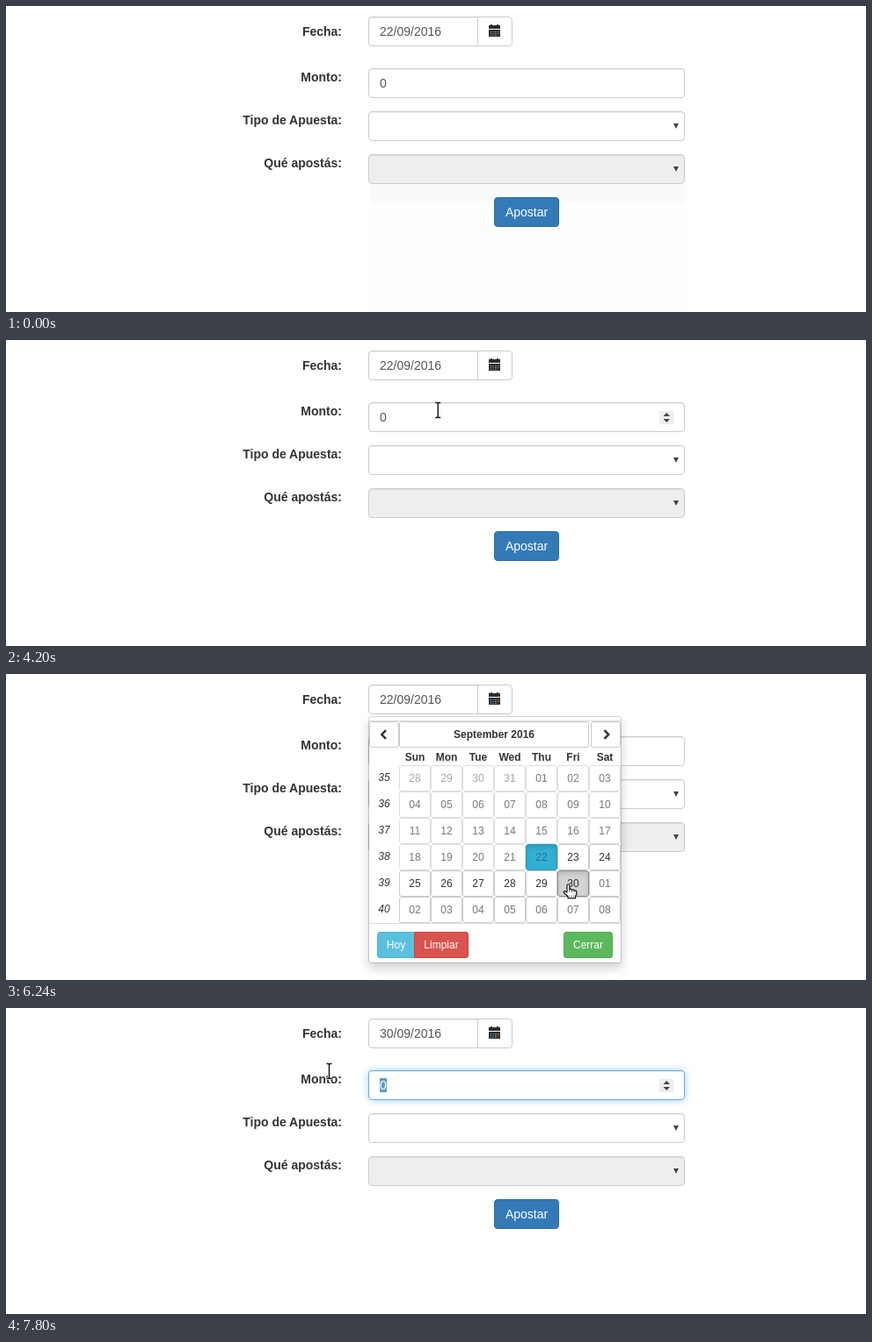
An HTML page that plays this animation: 978 px wide and 349 px high, repeating every 8 s.

```html
<!DOCTYPE html>
<html lang="es">
<head>
<meta charset="utf-8">
<title>Apuesta</title>
<style>
* { box-sizing: border-box; }
html, body { margin: 0; width: 100%; height: 100%; overflow: hidden; background: #fff; }
body { font: 14px/20px "Liberation Sans", Arial, sans-serif; color: #333; }
#stage { position: relative; width: 978px; height: 349px; overflow: hidden; }
#stage div { position: absolute; white-space: nowrap; }
svg { position: absolute; left: 0; top: 0; overflow: visible; }
.label { left: 182px; width: 200px; text-align: right; font-weight: bold; }
.field {
  left: 412px; width: 360px; height: 34px; padding: 6px 12px; color: #555; background: #fff;
  border: 1px solid #ccc; border-radius: 4px; box-shadow: inset 0 1px 1px rgba(0,0,0,.075);
}
.field.focus {
  border-color: #66afe9; z-index: 2;
  box-shadow: inset 0 1px 1px rgba(0,0,0,.075), 0 0 8px rgba(102,175,233,.6);
}
.btn { border: 1px solid #ccc; border-radius: 4px; background: #fff; text-align: center; }
.btn.hover { background: #e6e6e6; border-color: #adadad; }
.btn.down { background: #d4d4d4; border-color: #8c8c8c; box-shadow: inset 0 3px 5px rgba(0,0,0,.125); }
#pick { left: 536px; top: 12px; width: 40px; height: 34px; border-radius: 0 4px 4px 0; }
#send { left: 555px; top: 218px; width: 74px; height: 34px; padding: 6px 0; color: #fff; background: #337ab7; border-color: #2e6da4; }
#fade { left: 414px; top: 203px; width: 358px; height: 146px; background: #fdfefe; border-top: 22px solid #f9fafb; }
#spin { left: 743px; top: 81px; width: 16px; height: 15px; background: #eee; z-index: 3; }
#amount.sel span { background: #5a9dc0; color: #fff; }
#popup {
  left: 412px; top: 48px; width: 288px; height: 282px; z-index: 4; background: #fff; background-clip: padding-box;
  border: 1px solid rgba(0,0,0,.15); border-radius: 4px; box-shadow: 0 6px 12px rgba(0,0,0,.175);
  font-size: 12px; line-height: 18px;
}
#popup .btn { height: 30px; padding: 5px 0; border-radius: 3px; }
#popup .rule { left: 0; width: 286px; height: 1px; background: #ddd; }
#popup .head { width: 36px; text-align: center; font-weight: bold; }
#popup .week { left: 0; width: 34px; text-align: center; font-style: italic; }
#popup .muted { color: #777; }
#popup .off { opacity: .65; }
#popup .today {
  color: #31708f; background: #31b0d5; border-color: #269abc;
  box-shadow: inset 0 3px 5px rgba(0,0,0,.125);
}
#popup .today.hover { background: #269abc; border-color: #1b6d85; }
#popup .solid { color: #fff; }
#cursor { z-index: 9; }
</style>
</head>
<body>
<div id="stage">
  <div id="fade"></div>
  <div class="label" style="top:19px">Fecha:</div>
  <div class="label" style="top:71px">Monto:</div>
  <div class="label" style="top:120px">Tipo de Apuesta:</div>
  <div class="label" style="top:169px">Qué apostás:</div>

  <div class="field" id="date" style="top:12px;width:125px;border-radius:4px 0 0 4px"></div>
  <div class="btn" id="pick"></div>
  <div class="field" id="amount" style="top:71px"><span>0</span></div>
  <div class="field" style="top:120px"></div>
  <div class="field" style="top:169px;background:#eee"></div>
  <div class="btn" id="send">Apostar</div>

  <svg width="978" height="349">
    <path d="M759 134h6l-3 6zM759 183h6l-3 6z" fill="#444"/>
    <path d="M549 22h2v-1h2v1h5v-1h2v1h2v4h-13zM549 27h13v8h-13z" fill="#2d2d2d"/>
    <g stroke-width="1" fill="none" stroke-dasharray="1 1.5">
      <path d="M551 29.5h6M551 31.5h6M551 33.5h6" stroke="#7fa6c8"/>
      <path d="M557.5 29.5h4M557.5 31.5h4M557.5 33.5h2" stroke="#c98d5e"/>
    </g>
  </svg>

  <div id="spin"><svg width="16" height="15"><path d="M4.5 6h7.5l-3.75-4zM4.5 9h7.5l-3.75 4z" fill="#444"/></svg></div>

  <div id="popup">
    <div class="rule" style="top:4px"></div>
    <div class="rule" style="top:235px"></div>
    <svg width="286" height="280" style="z-index:1">
      <path d="M19 15.2l-4.7 4.8l4.7 4.8M267.500 15.2l4.700 4.800l-4.700 4.800" fill="none" stroke="#333" stroke-width="2.500"/>
    </svg>
  </div>

  <svg id="cursor" width="978" height="349">
    <g id="arrow">
      <path d="M.5.8V17l3.700-3.400 2.700 6 2.700-1.200-2.700-5.700h5z" fill="#fff" stroke="#111" stroke-width="1.200"/>
    </g>
    <g id="hand" transform="translate(-5 -1)">
      <path d="M4.500 10V2.200a1.400 1.400 0 0 1 2.900 0V6.500l1.800-.2 1 .8 1.800-.1 1 .9 1.800.3.6 1.200V12l-1.300 2.500v2.200H5.500v-2L1 10.500q-.6-2.200 1.300-1.700z"
        fill="#fff" stroke="#111" stroke-width="1.200" stroke-linejoin="round"/>
      <path d="M7.400 6.500v3M10 7.500v2.300M12.600 8.200v2" stroke="#111" stroke-width=".8"/>
      <path d="M7 14.300h6" stroke="#111" stroke-width="1" stroke-dasharray="1 1.300"/>
    </g>
    <g id="beam" fill="none">
      <path d="M-3-8.500h2l1 1 1-1h2M0-7.500v15M-3 8.500h2l1-1 1 1h2" stroke="#fff" stroke-width="3"/>
      <path d="M-3-8.500h2l1 1 1-1h2M0-7.500v15M-3 8.500h2l1-1 1 1h2" stroke="#111" stroke-width="1.400"/>
    </g>
  </svg>
</div>

<script>
const LOOP = 8000, STEP = 120;
const OPEN = 5040, CHOSEN = 6360, DRAG = 7560;
const $ = id => document.getElementById(id);
const popup = $("popup");

function add(cls, text, x, y, w) {
  const el = document.createElement("div");
  el.className = cls;
  el.textContent = text;
  el.style.left = x + "px";
  el.style.top = y + "px";
  if (w) el.style.width = w + "px";
  popup.append(el);
  return el;
}

function solid(text, x, w, fill, edge, radius) {
  const el = add("btn solid", text, x, 245, w);
  el.style.background = fill;
  el.style.borderColor = edge;
  el.style.borderRadius = radius;
}

add("btn", "", 0, 5, 34);
add("btn", "September 2016", 34, 5, 216).style.fontWeight = "bold";
add("btn", "", 252, 5, 34);
["Sun", "Mon", "Tue", "Wed", "Thu", "Fri", "Sat"].forEach((d, i) => add("head", d, 34 + 36 * i, 37));

const cells = {};
for (let row = 0; row < 6; row++) {
  add("week", 35 + row, 0, 60 + 30 * row);
  for (let col = 0; col < 7; col++) {
    const n = row * 7 + col - 3;
    const day = n < 1 ? n + 31 : n > 30 ? n - 30 : n;
    let cls = "btn";
    if (n < 1 || n > 30) cls += " muted";
    if (n < 22) cls += " off";
    if (n === 22) cls += " today";
    cells[n] = add(cls, String(day).padStart(2, "0"), 34 + 36 * col, 55 + 30 * row, 36);
  }
}
solid("Hoy", 9, 43, "#5bc0de", "#46b8da", "3px 0 0 3px");
solid("Limpiar", 51, 62, "#d9534f", "#d43f3a", "0 3px 3px 0");
solid("Cerrar", 221, 56, "#5cb85c", "#4cae4c", "3px");

// Pointer hotspot: time, x, y
const path = [
  [2400, 583, 329], [2640, 520, 225], [2880, 436, 85],
  [3240, 445, 0], [3480, 460, 28], [3840, 482.5, 84],
  [4080, 482.5, 84], [4320, 500, 76], [4680, 547, 31], [4800, 549, 25],
  [5040, 549, 25], [5520, 605, 213], [5760, 607, 219],
  [5880, 609, 225], [6240, 638.5, 240], [6360, 639, 240],
  [6600, 560, 164], [6960, 458, 114], [7080, 460, 82], [7200, 478, 30], [7440, 460, 90],
  [7560, 437, 90], [7680, 410, 86], [7800, 367.5, 72]
];

function pointer(t) {
  if (t < 2400 || (t >= 3000 && t < 3240)) return null;
  const i = path.findIndex(p => p[0] > t);
  if (i < 0) return path[path.length - 1].slice(1);
  const a = path[i - 1], b = path[i];
  const k = (t - a[0]) / (b[0] - a[0]);
  return [a[1] + (b[1] - a[1]) * k, a[2] + (b[2] - a[2]) * k];
}

const inside = (p, x, y, w, h) => !!p && p[0] >= x && p[0] < x + w && p[1] >= y && p[1] < y + h;
const show = (el, on) => { el.style.display = on ? "" : "none"; };
const flag = (el, cls, on) => el.classList.toggle(cls, on);

function render(ms) {
  const t = Math.floor(ms / STEP) * STEP;
  const p = pointer(t);
  const open = t >= OPEN && t < CHOSEN;
  const overPick = inside(p, 536, 12, 40, 34);
  const overAmount = inside(p, 412, 71, 360, 34);
  const overDate = inside(p, 412, 12, 124, 34);

  show($("fade"), t < STEP);
  $("date").textContent = (t < CHOSEN ? "22" : "30") + "/09/2016";
  flag($("date"), "focus", t >= CHOSEN && t < DRAG);
  flag($("amount"), "focus", t >= DRAG);
  flag($("amount"), "sel", t >= DRAG + STEP);
  show($("spin"), t >= DRAG || (overAmount && !open && t >= 3240));
  flag($("pick"), "hover", overPick);
  flag($("pick"), "down", t >= 4800 && t < OPEN);

  show(popup, open);
  flag(cells[22], "hover", inside(p, 591, 194, 36, 30));
  flag(cells[29], "hover", inside(p, 591, 224, 36, 30));
  flag(cells[30], "hover", inside(p, 627, 224, 36, 30));
  flag(cells[30], "down", t >= 6240 && open);

  let kind = "arrow";
  if (open || overPick) kind = "hand";
  else if (overDate || overAmount || t >= DRAG) kind = "beam";
  for (const id of ["arrow", "hand", "beam"]) show($(id), p && id === kind);
  if (p) {
    const shift = kind === "hand" ? [-5, -1] : [0, 0];
    $(kind).setAttribute("transform", `translate(${p[0] + shift[0]} ${p[1] + shift[1]})`);
  }
}

const start = performance.now();
function tick() {
  render((performance.now() - start) % LOOP);
  requestAnimationFrame(tick);
}
tick();
</script>
</body>
</html>
```
